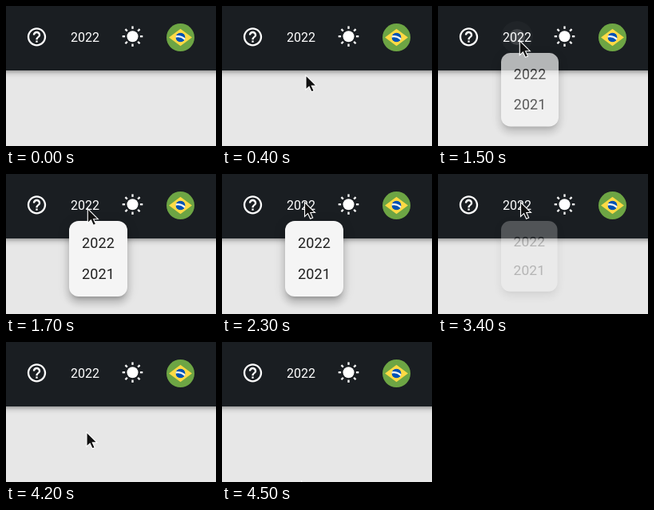
These frames come from a looping animation (263 by 176 pixels, 6700 ms). An HTML page:

```html
<!DOCTYPE html>
<html lang="en">
<head>
<meta charset="utf-8">
<title>Year menu</title>
<style>
html, body { margin: 0; width: 100%; height: 100%; overflow: hidden; background: #e7e7e7; }
body { position: relative; font-family: Roboto, sans-serif; }
header { position: absolute; left: -20px; width: 303px; height: 81px; background: #1a1e22;
  box-shadow: 0 2px 4px -1px #0003, 0 4px 5px #00000024, 0 1px 10px #0000001f; }
svg { position: absolute; left: 0; top: 0; }
#menu { position: absolute; left: 79px; top: 59px; width: 73px; height: 95px; border-radius: 12px;
  background: #f5f5f5; color: #000000de; font-size: 18px; letter-spacing: .00938em; transform-origin: 0 0;
  box-shadow: 0 5px 5px -3px #0003, 0 8px 10px 1px #00000024, 0 3px 14px 2px #0000001f; }
#menu div { position: relative; top: 8px; padding-left: 16px; line-height: 39px; }
</style>
</head>
<body>
<header></header>
<svg width="263" height="176" fill="#fff">
  <circle id="halo" cx="99" cy="39" r="20"/>
  <circle id="ripple" cx="99" cy="39"/>
  <path transform="translate(24.5 24.8) scale(1.167)" d="M11 18h2v-2h-2v2zm1-16C6.48 2 2 6.48 2 12s4.48 10 10 10 10-4.48 10-10S17.52 2 12 2zm0 18c-4.41 0-8-3.59-8-8s3.59-8 8-8 8 3.59 8 8-3.59 8-8 8zm0-14c-2.21 0-4 1.79-4 4h2c0-1.1.9-2 2-2s2 .9 2 2c0 2-3 1.75-3 5h2c0-2.25 3-2.5 3-5 0-2.21-1.79-4-4-4z"/>
  <text x="81" y="45" font-size="16">2022</text>
  <g id="sun" transform="translate(158.5 38.2)"><circle r="7"/></g>
  <g transform="translate(201 22) scale(.0684)">
    <clipPath id="globe"><circle cx="256" cy="256" r="89"/></clipPath>
    <circle cx="256" cy="256" r="256" fill="#6da544"/>
    <path d="M256 100 467 256 256 412 45 256z" fill="#ffda44"/>
    <g clip-path="url(#globe)">
      <circle cx="256" cy="256" r="89" fill="#0052b4"/>
      <circle cx="211" cy="401" r="167" fill="none" stroke="#f0f0f0" stroke-width="33"/>
    </g>
  </g>
</svg>
<div id="menu"><div>2022</div><div>2021</div></div>
<svg width="263" height="176">
  <path id="arrow" fill="#111" stroke="#fff" stroke-width="1.1" d="M0 0V18L4.1 14.2 7.1 20.7 10.2 19.4 7.3 13H13z"/>
  <path id="hand" fill="#fff" stroke="#111" stroke-width=".8" d="M-1.5 1.2Q0-.8 1.5 1.2V6Q3.2 5 4.4 6.5 6 5.6 7.2 7.2 10.4 6.4 10.4 9.5V12L9 16.5H1L-3.8 10.3Q-4.2 8-1.5 9z"/>
</svg>
<script>
const $ = id => document.getElementById(id);
const ramp = (t, from, to) => Math.min(1, Math.max(0, (t - from) / (to - from)));
const easeOut = p => 1 - (1 - p) ** 2;

for (let a = 0; a < 360; a += 45)
  $('sun').insertAdjacentHTML('beforeend',
    `<rect x="-1.15" y="-12.8" width="2.3" height="3.4" transform="rotate(${a})"/>`);

function pointer(t) {
  if (t < 100) return [0, 200];
  if (t < 1400) {
    const rest = (1 - ramp(t, 100, 750)) ** 1.6;
    return [103.5 + 4 * rest, 44.5 + 115 * rest];
  }
  if (t < 2300) return [102.3, 43.7];
  const exit = ramp(t, 3700, 4500);
  return [103.5 - 4 * exit, 35.5 + 139.5 * exit ** 1.24];
}

function draw(t) {
  const [x, y] = pointer(t);
  const menuOpen = t >= 1400 && t <= 3700;
  const pointing = y < 59 && !menuOpen;
  for (const id of ['arrow', 'hand'])
    $(id).setAttribute('transform', `translate(${x} ${y})`);
  $('arrow').style.display = pointing ? 'none' : '';
  $('hand').style.display = pointing ? '' : 'none';

  const glow = ramp(t, 500, 800) - ramp(t, 1300, 1600) + ramp(t, 3700, 3900) - ramp(t, 3900, 4100);
  $('halo').style.opacity = .085 * glow;
  $('ripple').setAttribute('r', 20 * ramp(t, 1400, 1600));
  $('ripple').style.opacity = .15 * (1 - ramp(t, 1500, 1700));

  const shown = easeOut(ramp(t, 1330, 1700)) - easeOut(ramp(t, 3300, 3500));
  const scale = 1 - .045 * (1 - shown);
  $('menu').style.opacity = shown;
  $('menu').style.transform = `scale(${scale}, ${scale * scale})`;
}

// The picture advances in steps of 100 ms
function tick() {
  draw(Math.floor(performance.now() % 6700 / 100) * 100);
  requestAnimationFrame(tick);
}
tick();
</script>
</body>
</html>
```
